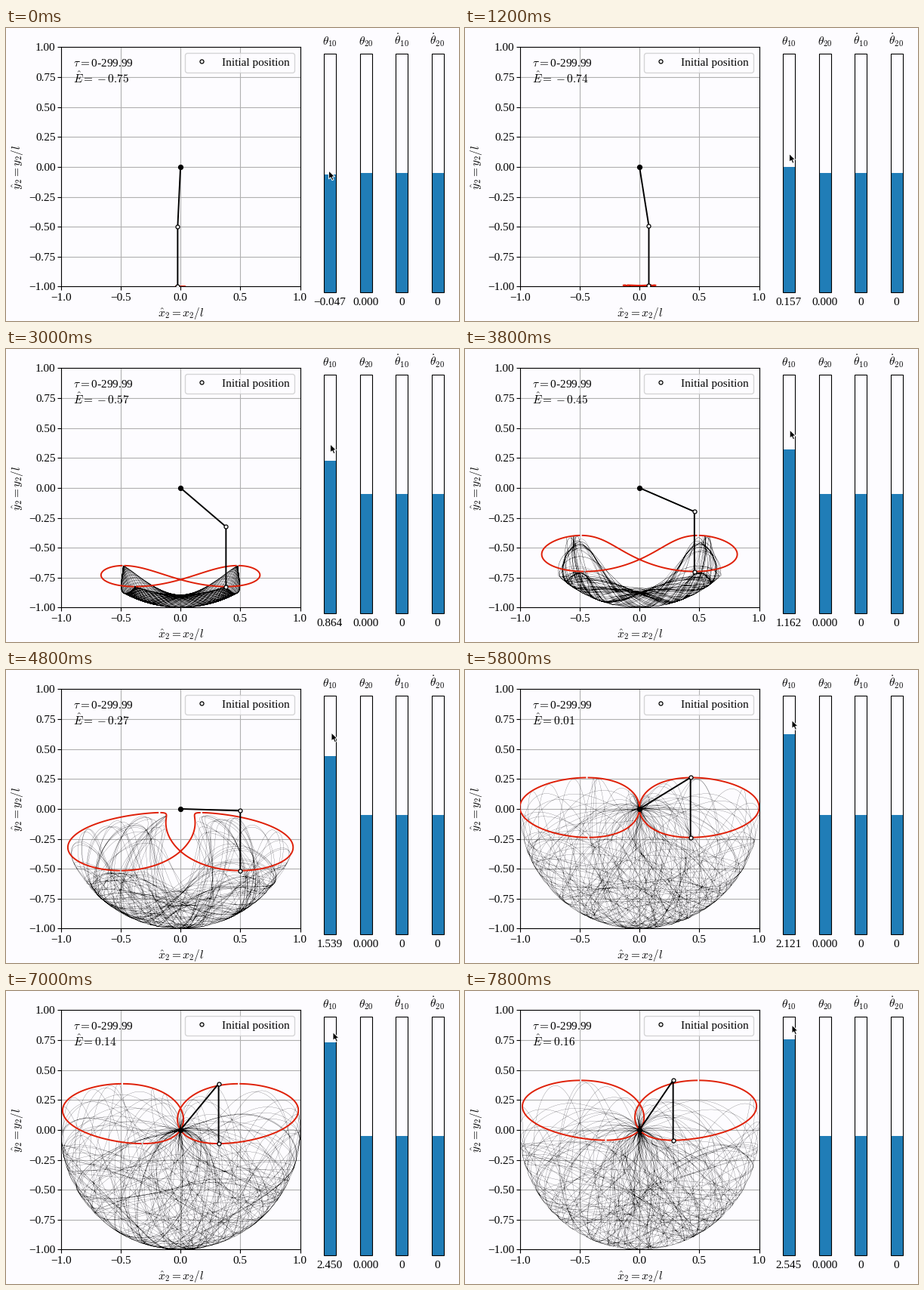
Write a matplotlib script that moves like this. It is 600 px wide and 388 px high and loops after 8000 ms.

```python
import numpy as np
import matplotlib.pyplot as plt
from matplotlib.animation import FuncAnimation
from matplotlib.patches import Polygon, Rectangle

plt.rcParams.update({
    "font.family": "Liberation Serif",
    "mathtext.fontset": "cm",
    "font.size": 11,
    "path.simplify": False,
})

W, H, DPI = 600, 388, 100
FRAMES, INTERVAL = 40, 200
PAPER, BLUE, RED = "#fdfcff", "#207db7", "#df2008"
STEPS, DT, GRAVITY = 30000, 0.01, 2.0

# Slider steps (pi/200 each) and pointer tip at a few moments
KEYS = [0, 6, 12, 15, 18, 24, 29, 35, 39]
SLIDER = [-3, 10, 45, 55, 69, 98, 135, 156, 162]
TIP_X = [427.5, 429.5, 429.5, 429.5, 430, 431, 433, 433, 433]
TIP_Y = [189, 166.5, 134, 126, 112, 83, 66.5, 54.5, 45]

ticks = np.arange(FRAMES)
theta = np.round(np.interp(ticks, KEYS, SLIDER)) * np.pi / 200
tip = np.column_stack([np.interp(ticks, KEYS, TIP_X), np.interp(ticks, KEYS, TIP_Y)])


def bob(a, b):
    """Position of the second mass for two half-length links."""
    return (np.sin(a) + np.sin(b)) / 2, -(np.cos(a) + np.cos(b)) / 2


def rates(s):
    a, b, p, q = s
    sd, cd = np.sin(a - b), np.cos(a - b)
    fb = p * p * sd - GRAVITY * np.sin(b)
    pa = (-q * q * sd - 2 * GRAVITY * np.sin(a) - cd * fb) / (2 - cd * cd)
    return np.array([p, q, pa, fb - pa * cd])


def trajectories(start):
    """RK4 for all starting angles at once."""
    s = np.zeros((4, len(start)))
    s[0] = start
    out = np.empty((STEPS, 2, len(start)))
    for i in range(STEPS):
        out[i] = s[:2]
        k1 = rates(s)
        k2 = rates(s + DT / 2 * k1)
        k3 = rates(s + DT / 2 * k2)
        k4 = rates(s + DT * k3)
        s = s + DT / 6 * (k1 + 2 * k2 + 2 * k3 + k4)
    return bob(out[::2, 0], out[::2, 1])


def limit_curve(energy):
    """Zero-velocity curve: four arcs with small gaps between them."""
    top = np.arccos(np.clip(-4 * energy - 2, -1, 1))
    gap = min(0.025, top / 10)
    u = np.linspace(0, 1, 300)
    if energy < -0.25:
        b = gap + (top - gap) * (1 - (1 - u) ** 2)
    else:
        b = gap + (np.pi - 2 * gap) * u
    a = np.arccos(np.clip(-2 * energy - np.cos(b) / 2, -1, 1))
    a[a < gap] = np.nan
    xs, ys = [], []
    for sa in (1, -1):
        for sb in (1, -1):
            x, y = bob(sa * a, sb * b)
            xs += [x, [np.nan]]
            ys += [y, [np.nan]]
    return np.concatenate(xs), np.concatenate(ys)


path_x, path_y = trajectories(theta)

fig = plt.figure(figsize=(W / DPI, H / DPI), dpi=DPI, facecolor=PAPER)

# Plot of the pendulum
side = 317
ax = fig.add_axes([72.6 / W, (H - 342.4) / H, side / W, side / H], facecolor=PAPER)
ax.set(xlim=(-1, 1), ylim=(-1, 1),
       xticks=np.arange(-1, 1.1, 0.5), yticks=np.arange(-1, 1.1, 0.25))
ax.set_axisbelow(True)
ax.grid(color="#b0b0b0", lw=0.8)
ax.tick_params(axis="x", pad=3)
ax.tick_params(axis="y", pad=1.6)

trace, = ax.plot([], [], color="black", lw=0.12, zorder=2)
limit, = ax.plot([], [], color=RED, lw=1.4, zorder=3)
rods, = ax.plot([], [], color="black", lw=1.4, zorder=4)
ax.plot(0, 0, "o", color="black", ms=4.2, zorder=5)
masses, = ax.plot([], [], "o", mfc="white", mec="black", ms=3.6, mew=0.9,
                  zorder=5, label="Initial position")
ax.legend(loc="upper right", facecolor=PAPER)

# Pixel overlay for sliders, labels and pointer
ui = fig.add_axes([0, 0, 1, 1])
ui.set(xlim=(0, W), ylim=(H, 0))
ui.axis("off")


def label(x, y, text, **kw):
    kw = {"ha": "center", "va": "baseline", **kw}
    return ui.text(x, y, text, **kw)


label(231.3, 382.4, r"$\hat{x}_2=x_2/l$")
label(15, 184, r"$\hat{y}_2=y_2/l$", rotation=90, va="center")
label(89, 51, r"$\tau=$0-299.99", ha="left")
energy_text = label(89, 72.8, "", ha="left")

BAR_TOP, BAR_LOW, BAR_W = 33.6, 350.2, 16
names = [r"$\theta_{10}$", r"$\theta_{20}$", r"$\dot{\theta}_{10}$", r"$\dot{\theta}_{20}$"]
bars, values = [], []
for i, name in enumerate(names):
    x = 421 + 47.5 * i
    mid = (BAR_TOP + BAR_LOW) / 2
    bar = Rectangle((x, mid), BAR_W, BAR_LOW - mid, fc=BLUE, ec="none")
    ui.add_patch(bar)
    ui.add_patch(Rectangle((x, BAR_TOP), BAR_W, BAR_LOW - BAR_TOP,
                           fill=False, ec="black", lw=0.8))
    label(x + BAR_W / 2, 22, name)
    values.append(label(x + BAR_W / 2, 367, "0.000" if i == 1 else "0"))
    bars.append(bar)

ARROW = np.array([(0, 0), (0, 11), (2.6, 8.8), (4.4, 12.8), (6.4, 11.9),
                  (4.7, 8), (8, 7.8)])
pointer = Polygon(ARROW, closed=True, fc="black", ec="white", lw=0.7, zorder=10)
ui.add_patch(pointer)


def update(i):
    a = theta[i]
    energy = -np.cos(a) / 2 - 0.25
    x1, y1 = np.sin(a) / 2, -np.cos(a) / 2
    x2, y2 = bob(a, 0)
    trace.set_data(path_x[:, i], path_y[:, i])
    limit.set_data(*limit_curve(energy))
    rods.set_data([0, x1, x2], [0, y1, y2])
    masses.set_data([x1, x2], [y1, y2])

    sign = r"\hspace{0.2}{-}\hspace{0.2}" if energy < 0 else ""
    energy_text.set_text(rf"$\hat{{E}}={sign}{abs(energy):.2f}$")
    values[0].set_text(f"{a:.3f}".replace("-", "\u2212"))
    height = (BAR_LOW - BAR_TOP) * (a + np.pi) / (2 * np.pi)
    bars[0].set_y(BAR_LOW - height)
    bars[0].set_height(height)
    pointer.set_xy(ARROW + tip[i])
    return trace, limit, rods, masses


anim = FuncAnimation(fig, update, frames=FRAMES, interval=INTERVAL,
                     repeat=True, repeat_delay=0, blit=False)
plt.show()
```
